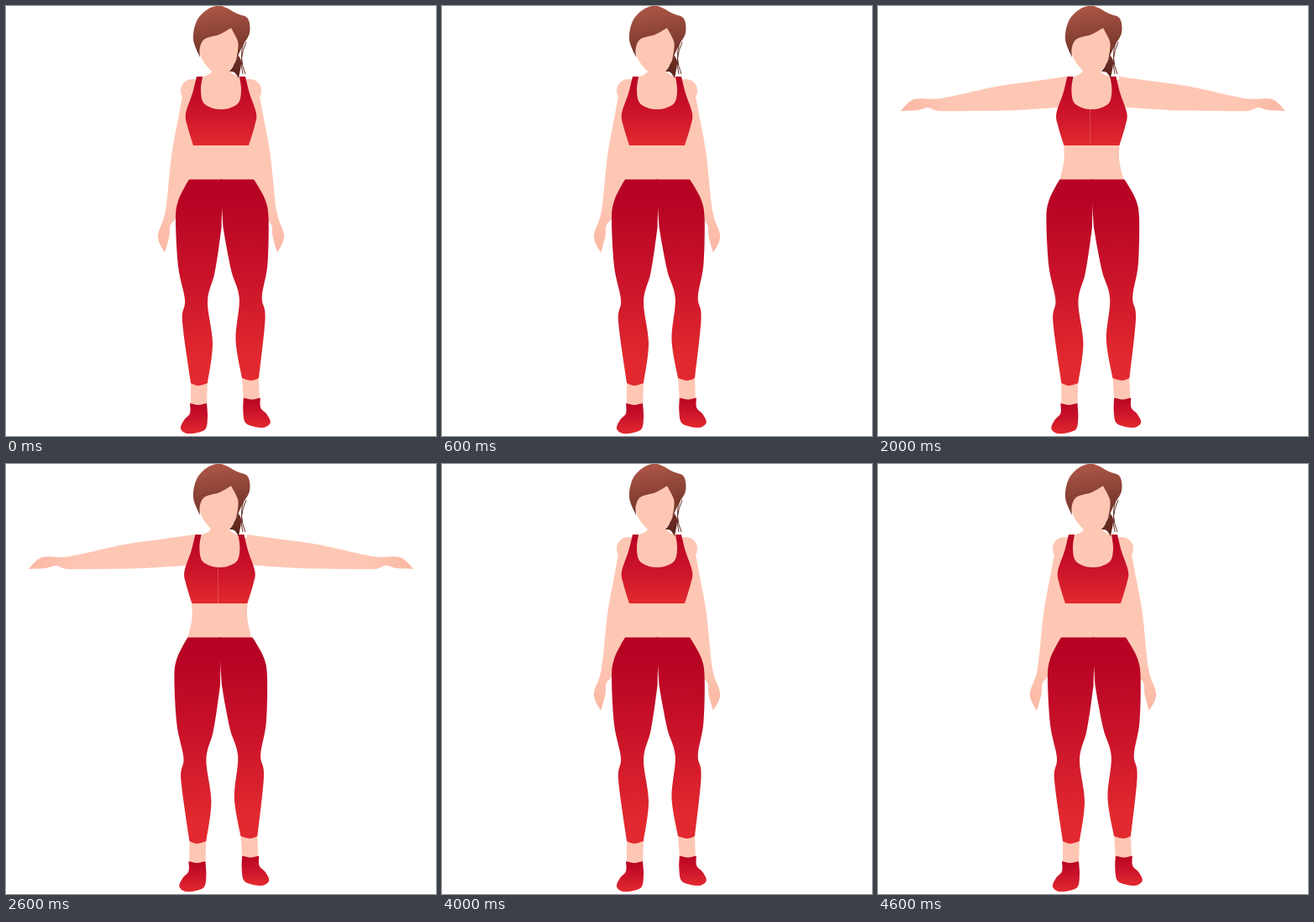
Recreate the animation shown at these times as an HTML page with a canvas. Size 512x512 px, loop 5 s.

```html
<!DOCTYPE html>
<html lang="en">
<head>
<meta charset="utf-8">
<title>Lateral arm raise</title>
<style>
html, body { margin: 0; width: 100%; height: 100%; overflow: hidden; background: #fff; }
canvas { display: block; width: 512px; height: 512px; }
</style>
</head>
<body>
<canvas width="512" height="512"></canvas>
<script>
const ctx = document.querySelector('canvas').getContext('2d');
const SKIN = '#fec7b4';
const REDS = ['#b80424', '#cb142a', '#e2292f'];

// Degrees the arms hang below horizontal, and the sway of the body.
const DOWN = { angle: 71.6, sway: 1 };
const HALF = { angle: 19.3, sway: 0 };
const LEVEL = { angle: 0, sway: -0.6 };
const STEPS = [DOWN, HALF, LEVEL, HALF, DOWN];

function gradient(x0, y0, x1, y1, colors) {
  const g = ctx.createLinearGradient(x0, y0, x1, y1);
  colors.forEach((c, i) => g.addColorStop(i / (colors.length - 1), c));
  return g;
}

// Each run is a smooth curve through its points; runs meet at corners.
function shape(fill, ...runs) {
  ctx.beginPath();
  for (const run of runs) {
    const p = run.split(' ').map(s => s.split(',').map(Number));
    ctx.lineTo(...p[0]);
    for (let i = 0; i < p.length - 1; i++) {
      const a = p[i - 1] || p[i], b = p[i], c = p[i + 1], d = p[i + 2] || c;
      ctx.bezierCurveTo(b[0] + (c[0] - a[0]) / 6, b[1] + (c[1] - a[1]) / 6,
        c[0] - (d[0] - b[0]) / 6, c[1] - (d[1] - b[1]) / 6, c[0], c[1]);
    }
  }
  ctx.closePath();
  ctx.fillStyle = fill;
  ctx.fill();
}

function transformed(matrix, paint) {
  ctx.save();
  ctx.transform(...matrix);
  paint();
  ctx.restore();
}

// Paints the left half, then its mirror image about x = axis.
function mirrored(axis, paint) {
  paint();
  transformed([-1, 0, 0, 1, 2 * axis, 0], paint);
}

function arm(angle) {
  ctx.fillStyle = SKIN;
  ctx.beginPath();
  ctx.arc(222, 101, 14, 0, 2 * Math.PI);
  ctx.fill();
  transformed([-1, 0, 0, 1, 225, 97], () => {
    ctx.rotate(angle * Math.PI / 180);
    shape(gradient(140, 0, 198, 0, [SKIN, '#fab7a3']),
      '0,-13 36,-8 85,-1 150,13 182,14 198,28', '198,28 178,27 165,24 152,28 115,28 60,27 0,23');
  });
}

function torso() {
  shape(SKIN, '257,70 244,70 244,78 237,83 226,86', '222,166 222,185 217,207', '257,207');
  shape(gradient(0, 85, 0, 166, REDS),
    '226,84 221,104 213,128 215,143 222,166', '257,166', '257,123 246,122 234,115 231,100 233,84');
}

function leg() {
  shape(SKIN, '219,446', '239,446', '238,476', '219,476');
  shape(gradient(0, 235, 0, 425, REDS),
    '217,206.5 212,215 204,232 201,254 204,310 212,350 209,376 219,449', '219,449 228,452 239,449',
    '239,449 245,402 239,352 247,320 252,290 255.5,264', '257,206.5');
  shape(gradient(0, 472, 0, 509, REDS),
    '218,473 228,475 238,473', '238,473 239,488 237,503 227,508 214,509 207,503 211,493 218,485 218,473');
}

function head() {
  const hair = gradient(250, 2, 262, 84, ['#aa5545', '#823d31', '#5c231b']);
  shape(hair, '274,56 280,66 277,86', '277,86 272,79 266,78', '266,78 271,70 268,60');
  shape(SKIN, '231,40 232,60 243,76 254,82 266,77 276,58 275,30 250,26 231,40');
  shape(hair, '231,61 223,40 227,18 240,4 256,0 275,9 288,15 290,32 282,47 274,64',
    '276,54 276,42 268,26', '268,26 254,34 237,39 231,49 231,61');

  ctx.strokeStyle = '#6b3029';
  ctx.beginPath();
  for (const x of [283, 286]) {
    ctx.moveTo(x, 43);
    ctx.quadraticCurveTo(277, 62, 568 - x, 81);
  }
  ctx.stroke();
}

function draw(now) {
  const { angle, sway } = STEPS[Math.floor(now / 1000) % STEPS.length];
  ctx.fillStyle = '#fff';
  ctx.fillRect(0, 0, 512, 512);
  mirrored(256, () => arm(angle));
  transformed([1, 0, 0, 1, sway, 0], () => {
    mirrored(255, torso);
    leg();
    // The right leg leans outwards and is slightly shorter.
    transformed([-1, 0, 0.033, 0.976, 504.2, 4.9], leg);
  });
  head();
}

const start = performance.now();
function tick() {
  draw(performance.now() - start);
  requestAnimationFrame(tick);
}
tick();
</script>
</body>
</html>
```
